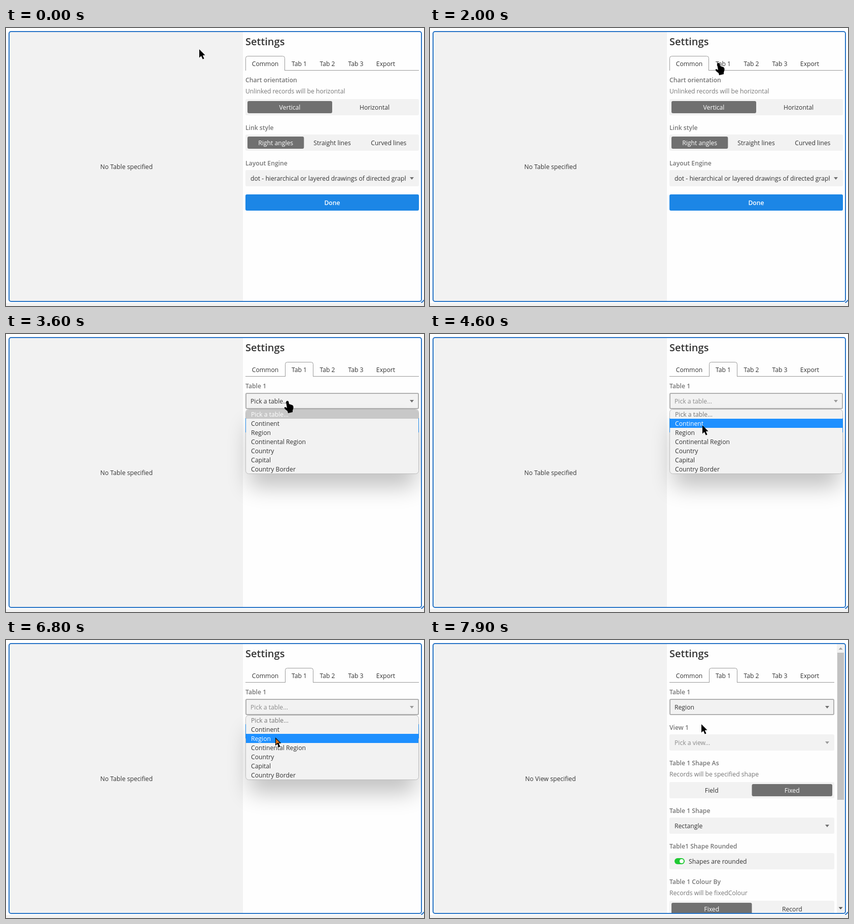
Write an HTML page with a canvas that moves like this. It is 824 px wide and 548 px high and loops after 8 s.

```html
<!DOCTYPE html>
<html lang="en">
<head>
<meta charset="utf-8">
<title>Chart settings</title>
<style>
  html, body { margin: 0; width: 824px; height: 548px; overflow: hidden; background: #fff; }
  canvas { display: block; }
</style>
</head>
<body>
<canvas id="stage" width="824" height="548"></canvas>
<script>
const ctx = document.getElementById('stage').getContext('2d');
const LOOP = 8000;
const TAB_AT = 2200, OPEN_AT = 3300, PRESS_AT = 6750, PICK_AT = 7000;
const C = {
  gray: '#f2f2f2', panel: '#fefefe', frame: '#2673c6', ink: '#333',
  label: '#757575', hint: '#777', pale: '#8a8a8a', chip: '#707070',
  blue: '#1c86e6', pick: '#1e90ff', line: '#999'
};
const OPTIONS = ['Pick a table...', 'Continent', 'Region', 'Continental Region',
  'Country', 'Capital', 'Country Border'];

// time, x, y of the pointer's tip
const PATH = [
  [0, 381, 42], [1500, 569, 69], [2250, 569, 69], [2650, 556, 109],
  [3000, 555, 132], [3600, 555, 132], [4400, 537, 180], [5400, 535, 184],
  [6500, 531, 192], [7000, 531, 192], [7600, 535, 166], [8000, 535, 166]
];

function pointerAt(t) {
  let i = 1;
  while (i < PATH.length - 1 && t > PATH[i][0]) i++;
  const [t0, x0, y0] = PATH[i - 1], [t1, x1, y1] = PATH[i];
  const p = (t - t0) / (t1 - t0);
  const k = p * p * (3 - 2 * p);
  return { x: Math.round(x0 + (x1 - x0) * k), y: Math.round(y0 + (y1 - y0) * k) };
}

function text(s, x, y, color = C.ink, { size = 12.2, weight = 400, align = 'left' } = {}) {
  ctx.font = `${weight} ${size}px "Open Sans", "Noto Sans", sans-serif`;
  ctx.textAlign = align;
  ctx.fillStyle = color;
  ctx.fillText(s, x, y);
}

const centered = (s, x, y, color, weight) => text(s, x, y, color, { align: 'center', weight });
const label = (s, y) => text(s, 472, y, C.label, { weight: 600 });
const hint = (s, y) => text(s, 472, y, C.hint);

function rect(x, y, w, h, color) {
  ctx.fillStyle = color;
  ctx.fillRect(x, y, w, h);
}

function round(x, y, w, h, r, fill, stroke, width = 1) {
  ctx.beginPath();
  ctx.roundRect(x, y, w, h, r);
  if (fill) { ctx.fillStyle = fill; ctx.fill(); }
  if (stroke) { ctx.strokeStyle = stroke; ctx.lineWidth = width; ctx.stroke(); }
}

function poly(points, fill) {
  ctx.beginPath();
  points.forEach(([x, y]) => ctx.lineTo(x, y));
  ctx.closePath();
  ctx.fillStyle = fill;
  ctx.fill();
}

function segments(names, active, y, right) {
  round(472, y, right - 472, 32, 3, C.gray);
  const w = (right - 480) / names.length;
  names.forEach((name, i) => {
    const x = 476 + i * w;
    if (i === active) round(x, y + 4, w, 24, 3, C.chip);
    centered(name, x + w / 2, y + 21, i === active ? '#fff' : C.ink);
  });
}

function select(value, y, right, color = C.ink, focused = false) {
  round(472, y, right - 472, 32, 3, C.gray);
  if (focused) round(473, y + 1, right - 474, 30, 2, null, '#b0b0b0', 2);
  ctx.save();
  ctx.beginPath();
  ctx.rect(480, y, right - 506, 32);
  ctx.clip();
  text(value, 482, y + 21, color);
  ctx.restore();
  const x = right - 14;
  poly([[x - 4, y + 14], [x + 4, y + 14], [x, y + 19]], color === C.pale ? '#9a9a9a' : C.chip);
}

function done(y) {
  round(472, y, 342, 32, 3, C.blue);
  centered('Done', 643, y + 21, '#fff', 600);
}

function tabs(active, right) {
  rect(472, 83, right - 472, 1, C.line);
  const [x, w] = active ? [550, 56] : [472, 78];
  rect(x + 1, 83, w - 2, 1, C.panel);
  ctx.beginPath();
  ctx.moveTo(x + .5, 84);
  ctx.arcTo(x + .5, 55.5, x + w - .5, 55.5, 4);
  ctx.arcTo(x + w - .5, 55.5, x + w - .5, 84, 4);
  ctx.lineTo(x + w - .5, 84);
  ctx.strokeStyle = C.line;
  ctx.lineWidth = 1;
  ctx.stroke();
  ['Common', 'Tab 1', 'Tab 2', 'Tab 3', 'Export'].forEach((name, i) =>
    centered(name, [511, 578, 633.5, 689.5, 748.5][i], 75));
}

function commonPage() {
  label('Chart orientation', 107);
  hint('Unlinked records will be horizontal', 129);
  segments(['Vertical', 'Horizontal'], 0, 140, 814);
  label('Link style', 201);
  segments(['Right angles', 'Straight lines', 'Curved lines'], 0, 210, 814);
  label('Layout Engine', 271);
  select('dot - hierarchical or layered drawings of directed graphs', 280, 814);
  done(328);
}

function optionList(hover, fresh) {
  ctx.save();
  ctx.shadowColor = 'rgba(0,0,0,.24)';
  ctx.shadowBlur = 44;
  ctx.shadowOffsetY = 26;
  round(479, 155, 328, 120, 6, C.gray);
  ctx.restore();
  round(472.5, 148.5, 341, 127, 6, C.gray, '#bcbcbc');
  if (fresh) {
    ctx.save();
    round(473, 149, 340, 126, 6);
    ctx.clip();
    rect(473, 149, 340, 18, '#c8c8c8');
    ctx.restore();
  } else if (hover > 0) {
    rect(473, 149 + hover * 18, 340, 18, C.pick);
  }
  // the covered button stays visible along the edges
  rect(472, 166, 1, 28, C.blue);
  rect(813, 166, 1, 28, C.blue);
  OPTIONS.forEach((name, i) => {
    let color = i ? C.ink : C.label;
    if (i === hover || (fresh && !i)) color = '#fff';
    text(name, 483, 163 + i * 18, color);
  });
}

function tablePage(t, pointer) {
  const open = t >= OPEN_AT;
  const row = Math.floor((pointer.y - 149) / 18);
  const fresh = open && row < 0;
  label('Table 1', 107);
  select(OPTIONS[0], 116, 814, fresh ? C.ink : C.pale, open);
  done(164);
  if (open) optionList(row, fresh);
}

function detailPage() {
  const right = 797;
  label('Table 1', 107);
  select('Region', 116, right, C.ink, true);
  label('View 1', 177);
  select('Pick a view...', 186, right, C.pale);
  label('Table 1 Shape As', 247);
  hint('Records will be specified shape', 269);
  segments(['Field', 'Fixed'], 1, 280, right);
  label('Table 1 Shape', 341);
  select('Rectangle', 350, right);
  label('Table1 Shape Rounded', 411);
  round(472, 420, 325, 32, 3, C.gray);
  round(482, 430, 20, 12, 6, '#20c933');
  round(492, 432, 8, 8, 4, '#fff');
  text('Shapes are rounded', 510, 441);
  label('Table 1 Colour By', 481);
  hint('Records will be fixedColour', 503);
  segments(['Fixed', 'Record'], 0, 514, right);

  rect(802, 8, 16, 530, '#f1f1f1');
  rect(803, 25, 13, 290, '#c1c1c1');
  poly([[805.5, 19], [813.5, 19], [809.5, 14.5]], '#a3a3a3');
  poly([[805.5, 526.5], [813.5, 526.5], [809.5, 531]], '#505050');
}

function arrow(fill) {
  poly([[0, 0], [0, 16.5], [3.8, 13], [6.8, 19.5], [9.6, 18.2], [6.7, 12], [11.5, 11.5]], '#000');
  if (fill) poly([[1.2, 3], [1.2, 13.5], [4, 11], [8.7, 10.5]], fill);
}

function hand() {
  ctx.beginPath();
  ctx.moveTo(-3, 2);
  ctx.quadraticCurveTo(-1, -2, 2, 1);
  ctx.lineTo(3, 6);
  ctx.lineTo(9, 8);
  ctx.quadraticCurveTo(12, 9, 11.5, 14);
  ctx.lineTo(10, 19);
  ctx.lineTo(10, 22);
  ctx.lineTo(1, 24);
  ctx.lineTo(0, 20);
  ctx.lineTo(-5, 16);
  ctx.quadraticCurveTo(-8, 12, -4, 12);
  ctx.lineTo(-1, 14);
  ctx.closePath();
  ctx.fillStyle = '#000';
  ctx.fill();
}

function drawPointer(t, { x, y }) {
  const onTabs = x > 472 && x < 780 && y > 55 && y < 84;
  const onField = t < PICK_AT && y > 116 && y < 148;
  ctx.save();
  ctx.translate(x, y);
  if (onTabs || onField) hand();
  else arrow(t >= PRESS_AT && t < PICK_AT ? '#e0761c' : null);
  ctx.restore();
}

function draw(t) {
  const pointer = pointerAt(t), picked = t >= PICK_AT;
  rect(0, 0, 824, 548, '#fff');
  rect(0, 542, 824, 6, C.gray);
  round(6, 7, 813, 532, 4, C.panel);
  rect(7, 8, 460, 530, C.gray);
  centered(picked ? 'No View specified' : 'No Table specified', 237.5, 278);

  ctx.save();
  ctx.beginPath();
  ctx.rect(7, 8, 811, 530);
  ctx.clip();
  text('Settings', 472, 34, C.ink, { size: 20, weight: 600 });
  tabs(t >= TAB_AT ? 1 : 0, picked ? 797 : 814);
  if (picked) detailPage();
  else if (t >= TAB_AT) tablePage(t, pointer);
  else commonPage();
  ctx.restore();

  round(6, 7, 813, 532, 4, null, C.frame, 2);
  ctx.beginPath();
  ctx.moveTo(823, 536);
  ctx.quadraticCurveTo(823, 540, 818, 541);
  ctx.stroke();
  drawPointer(t, pointer);
}

const start = performance.now();
function tick(now) {
  draw(Math.max(0, now - start) % LOOP);
  requestAnimationFrame(tick);
}
draw(0);
requestAnimationFrame(tick);
</script>
</body>
</html>
```
